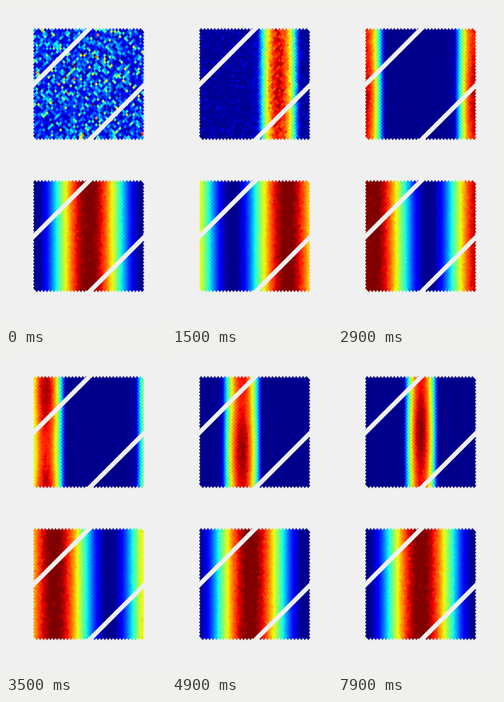
Recreate the animation shown at these times as a matplotlib script. Size 200x400 px, loop 8000 ms.

```python
import numpy as np
import matplotlib.pyplot as plt
from matplotlib.animation import FuncAnimation
from matplotlib.collections import PolyCollection

W, H = 200, 400
FRAMES, STEP = 80, 100
BG = "#f0f0f0"
COLS, ROWS = 32, 64
LEFT, TOP = 34.3, 27.8
PERIOD = 138.0
PITCH = PERIOD / (COLS + 0.5)
HALF_W, HALF_H = 2.3, 3.0
ROW_STEP = (139.6 - 2 * HALF_H) / (ROWS - 1)
START, TURN_TIME, LAG = 103.8, 5.1, 10.5

row, col = np.mgrid[:ROWS, :COLS]
cx = (LEFT + PITCH * (col + 0.5 + 0.5 * (row % 2))).ravel()
cy = (TOP + HALF_H + ROW_STEP * row).ravel()
diamond = np.array([(0, -HALF_H), (HALF_W, 0), (0, HALF_H), (-HALF_W, 0)])

fig = plt.figure(figsize=(W / 100, H / 100), dpi=100, facecolor=BG)
ax = fig.add_axes([0, 0, 1, 1])
ax.set_xlim(0, W)
ax.set_ylim(H, 0)
ax.axis("off")


def add_sheet(dy):
    centres = np.column_stack([cx, cy + dy])
    cells = PolyCollection(centres[:, None, :] + diamond, cmap="jet",
                           linewidths=0.3, edgecolors="face")
    cells.set_clim(0, 1)
    ax.add_collection(cells)
    for total, y0, y1 in ((132.5, 20, 108), (271.5, 90, 176)):
        ax.plot([total - y0, total - y1], [y0 + dy, y1 + dy],
                color=BG, lw=5.6 * 0.72, solid_capstyle="butt")
    return cells


activity = add_sheet(0)
drive = add_sheet(190)


def drive_centre(t):
    return START + PERIOD * min(t / TURN_TIME, 1)


def offset(centre):
    """Signed distance to a centre on the ring."""
    return (cx - centre + PERIOD / 2) % PERIOD - PERIOD / 2


def drive_level(t, rng):
    wave = 0.51 + 0.51 * np.cos(2 * np.pi * offset(drive_centre(t)) / PERIOD)
    return wave * (1 + 0.015 * rng.standard_normal(cx.size))


def bump(t):
    moving = np.exp(-max(t - TURN_TIME, 0) / 0.45)
    d = offset(drive_centre(t) - LAG * moving)
    early = 1.5 * np.exp(-max(t - 1.5, 0) / 0.6)
    width = 22 + early + moving * np.where(d < 0, 4.5, 3)
    shape = np.cos(np.clip(np.pi * d / (2 * width), -np.pi / 2, np.pi / 2))
    tail = 0.1 * moving * np.clip(1 + d / 42, 0, 1) * (d < -12)
    cy_mid = 98 + 52 * np.exp(-(t - 4.1) / 1.1)
    depth = 0.05 * min(t / 4, 1)
    ripple = 1 - depth + depth * np.cos(2 * np.pi * (cy - cy_mid) / 139)
    return np.maximum(shape, tail) * ripple


def activity_level(t, rng):
    noise = rng.gamma(2, 0.1, cx.size) * np.exp(-t / 0.75)
    grown = (1 - 0.2 * np.exp(-t / 2)) / (1 + np.exp(-(t - 0.6) / 0.13)) if t else 0
    jitter = 1 + (0.012 + 0.12 * np.exp(-t / 0.9)) * rng.standard_normal(cx.size)
    return noise + grown * bump(t) * jitter


def update(i):
    t = i * STEP / 1000
    rng = np.random.default_rng(500 + i)
    for cells, level in ((activity, activity_level), (drive, drive_level)):
        cells.set_array(np.clip(level(t, rng), 0.014, 1))
    return activity, drive


anim = FuncAnimation(fig, update, frames=FRAMES, interval=STEP,
                     repeat=True, repeat_delay=0)
plt.show()
```
